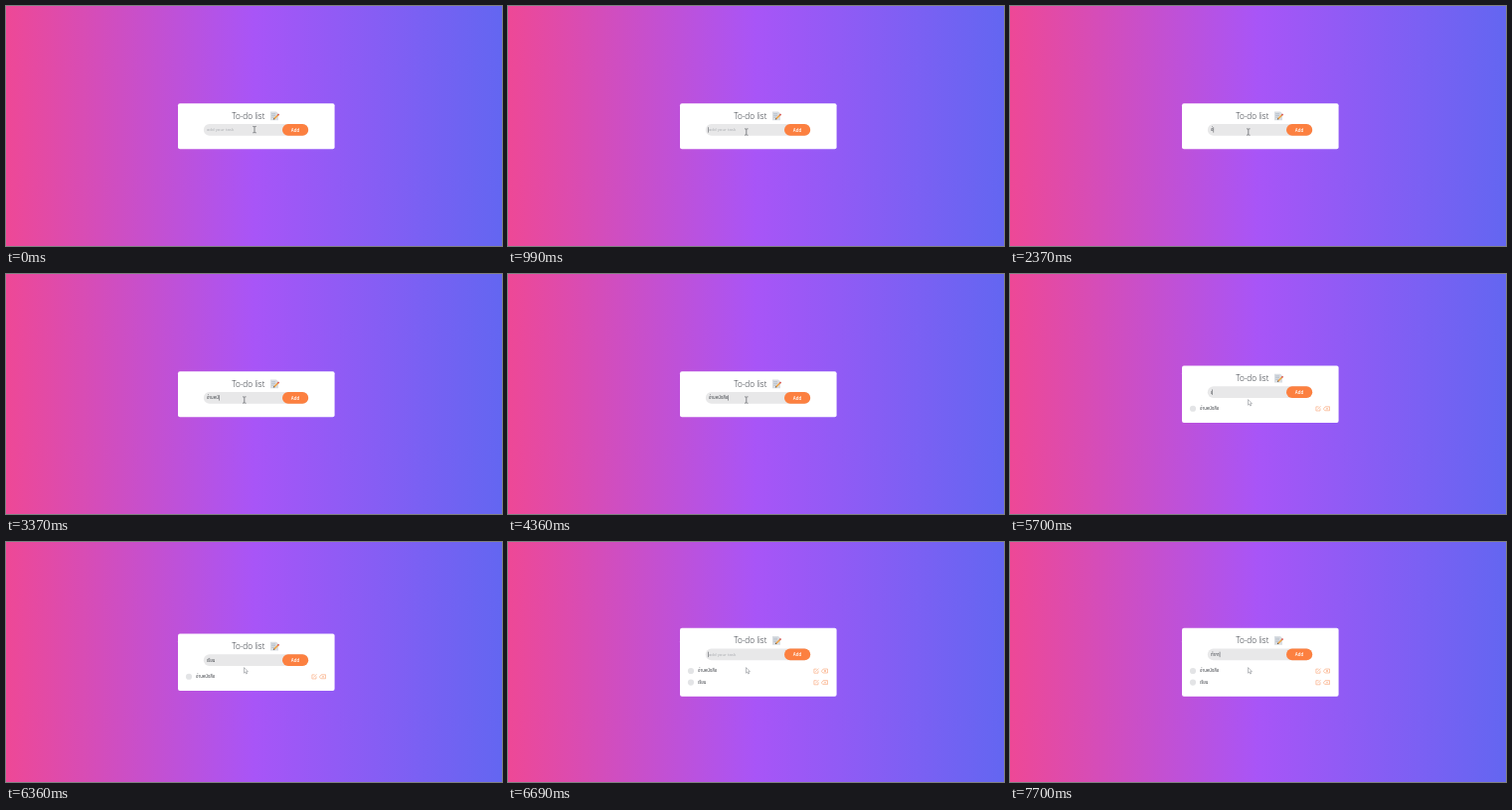
Animation, 499 px wide and 242 px high, one loop 8 s. Source, as an HTML page:

```html
<!DOCTYPE html>
<html lang="en">
<head>
<meta charset="utf-8">
<title>To-do list</title>
<style>
html, body { margin: 0; width: 100%; height: 100%; overflow: hidden; }
body { background: linear-gradient(90deg, #ee4896, #a855f7 50%, #6366f1); }
svg { display: block; width: 499px; height: 242px; }
text { font-family: "Open Sans", "Noto Sans", "Noto Sans Thai", sans-serif; }
.title { font-size: 8.2px; font-weight: 300; fill: #262b33; }
.small { font-size: 4.3px; fill: #3f4248; }
.hint { font-size: 4.3px; fill: #a9abb0; }
.add { font-size: 4.4px; font-weight: 600; fill: #fff; text-anchor: middle; }
.icon { fill: none; stroke: #f8a173; stroke-width: .6; stroke-linejoin: round; stroke-linecap: round; }
</style>
</head>
<body>
<svg viewBox="0 0 499 242">
  <defs>
    <g id="icons" class="icon">
      <path d="M310.2-1.9H307.9V2.2H312V0M309.6.5L312.3-2.2"/>
      <path d="M315.6 0L317.2-2H321.5V2H317.2ZM318.2-.8L319.8.8M319.8-.8L318.2.8"/>
    </g>
  </defs>
  <rect id="card" x="173" width="157.6" rx="2" fill="#fff"/>
  <g id="form">
    <text class="title" x="227.2" y="15.5">To-do list</text>
    <g id="memo">
      <path d="M266 8.3H272L274 10.2V17H266Z" fill="#d9dde2"/>
      <path d="M267.2 10.5H271M267.2 12.2H271M267.2 14H270" stroke="#9aa9b8" stroke-width=".5"/>
      <path d="M269.8 15.5L273.8 11.6" stroke="#efa243" stroke-width="1.6"/>
      <path d="M273.4 12L274.6 10.8" stroke="#d85b5b" stroke-width="1.7"/>
      <path d="M268.8 16.4L269.3 14.9L270.4 16Z" fill="#4a4037"/>
    </g>
    <rect x="198.8" y="20.9" width="105.4" height="11.6" rx="5.8" fill="#e8e8e9"/>
    <rect x="278" y="20.9" width="26.2" height="11.6" rx="5.8" fill="#fc8040"/>
    <text class="add" x="291" y="28.4">Add</text>
    <text id="hint" class="hint" x="201.9" y="28.3">add your task</text>
    <text id="typed" class="small" x="201.9" y="28.3"></text>
    <rect id="caret" y="24" width=".5" height="5.4" fill="#3f4248"/>
    <g class="item">
      <circle cx="184" cy="43.3" r="3.1" fill="#e3e4e6"/>
      <text class="small" x="191" y="44.8">อ่านหนังสือ</text>
      <use href="#icons" y="43.3"/>
    </g>
    <g class="item">
      <circle cx="184" cy="54.9" r="3.1" fill="#e3e4e6"/>
      <text class="small" x="191" y="56.4">เรียน</text>
      <use href="#icons" y="54.9"/>
    </g>
  </g>
  <path id="beam" d="M-1.7-3.2Q-.4-3.2 0-2.7Q.4-3.2 1.7-3.2M0-2.7V2.7M-1.7 3.2Q-.4 3.2 0 2.7Q.4 3.2 1.7 3.2" fill="none" stroke="#55585e" stroke-width=".7"/>
  <path id="arrow" d="M239.5 126.6V132.2L240.8 131L241.7 133L242.6 132.6L241.7 130.7H243.4Z" fill="#fff" stroke="#777a80" stroke-width=".5"/>
</svg>
<script>
const $ = id => document.getElementById(id);
const LOOP = 8000;

// start ms, item count, typed text, caret shown
const steps = [
  [0, 0, "", 0], [990, 0, "", 1], [1320, 0, "อ", 1], [1690, 0, "อ", 0],
  [2020, 0, "อ", 1], [2370, 0, "อ่", 1], [2680, 0, "อ่า", 1], [3020, 0, "อ่าน", 1],
  [3370, 0, "อ่านหนั", 1], [3700, 0, "อ่านหนัง", 1], [4030, 0, "อ่านหนังส", 1],
  [4360, 0, "อ่านหนังสือ", 1],
  [4680, 1, "", 0], [5360, 1, "", 1], [5700, 1, "เ", 1], [6030, 1, "เร", 1],
  [6360, 1, "เรียน", 0],
  [6690, 2, "", 1], [7030, 2, "ท", 1], [7360, 2, "ทำก", 1], [7700, 2, "ทำกา", 1]
];
// start ms, x, y of the text pointer
const moves = [[0, 250, 124.6], [320, 247, 121.8], [650, 241, 126], [990, 239.8, 127]];

const last = (list, t) => list.filter(row => row[0] <= t).pop();
const show = (el, on) => el.setAttribute("visibility", on ? "visible" : "hidden");
const items = document.querySelectorAll(".item");

function draw(now) {
  const t = now % LOOP;
  const [, count, text, caret] = last(steps, t);
  const [, x, y] = last(moves, t);
  const height = 46 + 11.5 * count;
  const top = 121.2 - height / 2;

  $("card").setAttribute("y", top);
  $("card").setAttribute("height", height);
  $("form").setAttribute("transform", `translate(0 ${top})`);
  items.forEach((item, i) => show(item, i < count));

  $("typed").textContent = text;
  show($("hint"), !text);
  const end = text ? $("typed").getComputedTextLength() + .2 : -.5;
  $("caret").setAttribute("x", 201.9 + end);
  show($("caret"), caret);

  $("beam").setAttribute("transform", `translate(${x} ${y})`);
  show($("beam"), count === 0);
  show($("arrow"), count > 0);
  requestAnimationFrame(draw);
}
requestAnimationFrame(draw);
</script>
</body>
</html>
```
